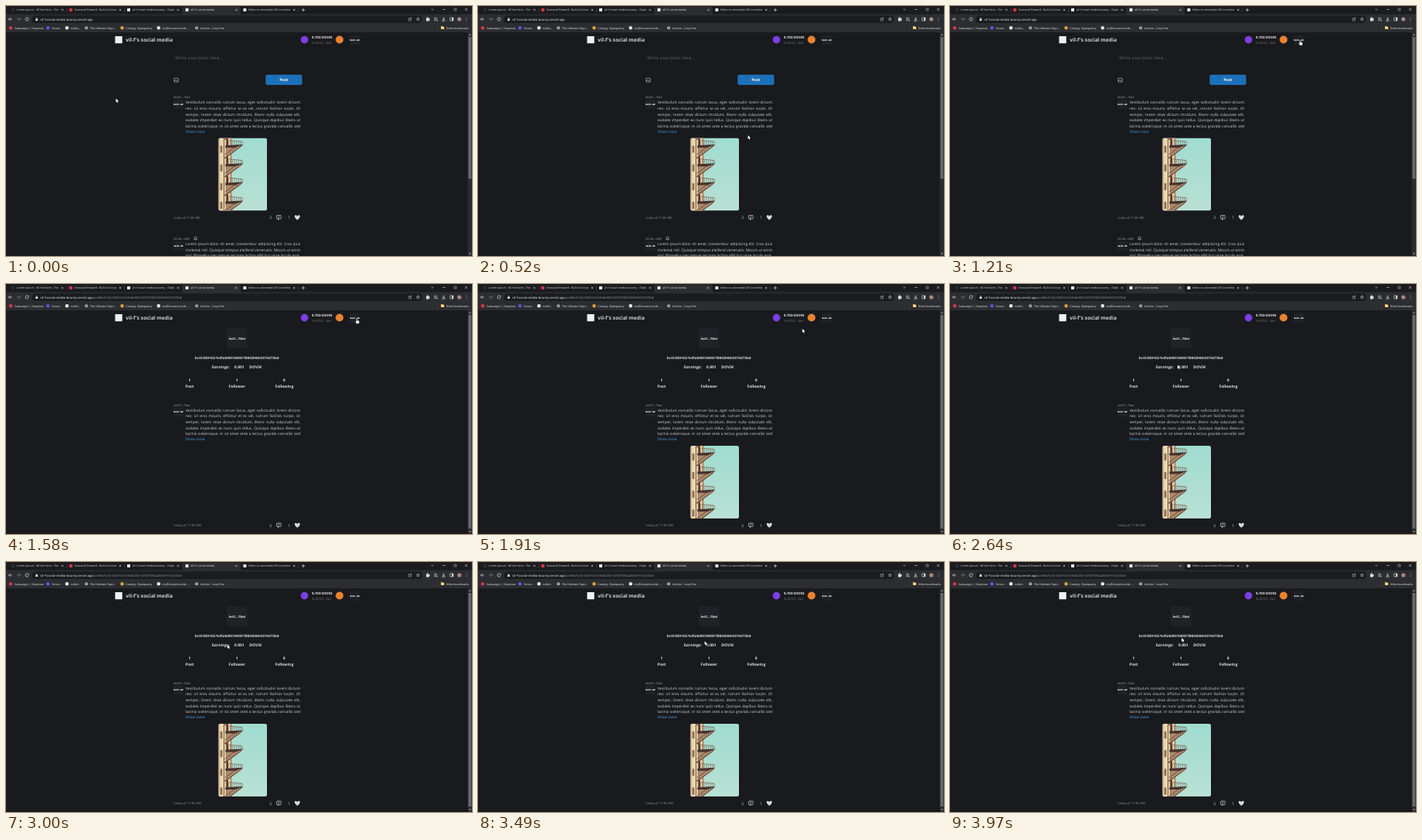
Write an HTML page with a canvas that moves like this. It is 600 by 323 pixels and loops after 4 s.

```html
<!DOCTYPE html>
<html lang="en">
<head>
<meta charset="utf-8">
<title>Social media demo</title>
<style>
html, body { margin: 0; width: 100%; height: 100%; overflow: hidden; background: #191a1d; }
canvas { display: block; width: 600px; height: 323px; }
</style>
</head>
<body>
<canvas id="stage"></canvas>
<script>
const W = 600, H = 323, LOOP = 4000;
const PAGE_AT = 1400, PHOTO_AT = 1850;
const FONT = '"Open Sans", "Noto Sans", sans-serif';
const PAGE = '#191a1d', BOX = '#212227', LIGHT = '#d0d1d4', DIM = '#8d9096';
const STRIP = '#1b1c1f', BAR = '#2c2d31', INK = '#dcdee1';
const ADDR = '0x3C5D81627e4fab0941605D7B842E68c9315d72bd';
const TOKEN = 'DOVIK';
const short = (head, tail) => ADDR.slice(0, head) + '...' + ADDR.slice(-tail);

const POST_1 = [
  'Vestibulum convallis rutrum lacus, eget sollicitudin lorem dictum',
  'nec. Ut eros mauris, efficitur et ex vel, rutrum facilisis turpis. Ut',
  'semper, lorem vitae dictum tincidunt, libero nulla vulputate elit,',
  'sodales imperdiet ex nunc quis tellus. Quisque dapibus libero ut',
  'lacinia scelerisque. In sit amet ante a lectus gravida convallis sed'
];
const POST_2 = [
  'Lorem ipsum dolor sit amet, consectetur adipiscing elit. Cras quis',
  'molestie nisl. Quisque tempus eleifend venenatis. Mauris ut enim',
  'nisl. Phasellus nec neque vel ante lacinia efficitur vitae iaculis erat.'
];

// time, x, y of the pointer tip
const PATH = [
  [0, 141.5, 119.5], [520, 347.5, 167], [1010, 450, 44.5], [1210, 450.3, 44.5],
  [1580, 451.2, 45], [1740, 451.2, 45], [2300, 300.3, 102.3], [3000, 285, 106.7],
  [3970, 298.3, 98], [4000, 298.3, 98]
];

const canvas = document.getElementById('stage');
const dpr = window.devicePixelRatio || 1;
canvas.width = W * dpr;
canvas.height = H * dpr;
const c = canvas.getContext('2d');

function rect(x, y, w, h, fill, r = 0) {
  c.fillStyle = fill;
  c.beginPath();
  c.roundRect(x, y, w, h, r);
  c.fill();
}

function disc(x, y, r, fill) {
  c.fillStyle = fill;
  c.beginPath();
  c.arc(x, y, r, 0, Math.PI * 2);
  c.fill();
}

function ring(x, y, r, color, width = 0.6, from = 0, to = Math.PI * 2) {
  c.strokeStyle = color;
  c.lineWidth = width;
  c.beginPath();
  c.arc(x, y, r, from, to);
  c.stroke();
}

function trace(points) {
  c.beginPath();
  for (let i = 0; i < points.length; i += 2) c.lineTo(points[i], points[i + 1]);
}

function line(color, width, ...points) {
  trace(points);
  c.strokeStyle = color;
  c.lineWidth = width;
  c.stroke();
}

function poly(fill, ...points) {
  trace(points);
  c.closePath();
  c.fillStyle = fill;
  c.fill();
}

function frame(x, y, w, h, color, r = 0.6, width = 0.6) {
  c.strokeStyle = color;
  c.lineWidth = width;
  c.beginPath();
  c.roundRect(x, y, w, h, r);
  c.stroke();
}

// Type is set at ten times its size and scaled down, for exact advances.
function text(str, x, y, size, color, style = '', align = 'left') {
  c.save();
  c.translate(x, y);
  c.scale(0.1, 0.1);
  c.font = `${style} ${size * 10}px ${FONT}`;
  c.textAlign = align;
  c.fillStyle = color;
  c.fillText(str, 0, 0);
  c.restore();
}

function justified(str, x, y, width, size, color) {
  const words = str.split(' ');
  c.font = `${size * 10}px ${FONT}`;
  const widths = words.map(w => c.measureText(w).width / 10);
  const gap = (width - widths.reduce((a, b) => a + b)) / (words.length - 1);
  words.forEach((word, i) => {
    text(word, x, y, size, color);
    x += widths[i] + gap;
  });
}

function clipped(x, y, w, h, draw) {
  c.save();
  c.beginPath();
  c.rect(x, y, w, h);
  c.clip();
  draw();
  c.restore();
}

function cross(x, y, r, color) {
  line(color, 0.6, x - r, y - r, x + r, y + r);
  line(color, 0.6, x - r, y + r, x + r, y - r);
}

function tab(x, title, color, active) {
  if (active) rect(x - 6, 0.8, 75, 12, BAR, 2.5);
  rect(x - 2, 3, 4, 4, color, 0.8);
  clipped(x + 4.5, 0, 54, 10, () => text(title, x + 4.5, 6.4, 3.65, active ? '#f0f1f3' : '#d8dadd', '500'));
  cross(x + 63.5, 5, 1.2, INK);
}

function tabs() {
  rect(0, 0, W, 34, STRIP);
  tab(9, 'Lorem ipsum - All the facts - Text', '#2c2d31');
  tab(83.5, 'Seasonal Reward - Build a Social', '#d9364c');
  tab(158, 'vil-f-social-media-bounty – Deploy', '#f2f2f2');
  rect(0, 10.5, W, 23.5, BAR);
  tab(233, "vil-f's social media", '#f2f2f2', true);
  tab(307.5, 'Video to animated GIF converter', '#e4e4e4');
  for (const x of [78.5, 152.5, 376]) line('#4c4e52', 0.5, x, 2.5, x, 8);
  line(INK, 0.7, 380.5, 5, 385, 5);
  line(INK, 0.7, 382.7, 2.8, 382.7, 7.2);
  line(INK, 0.6, 547.5, 3.8, 549, 5.2, 550.5, 3.8);
  line(INK, 0.6, 562.5, 4.5, 566, 4.5);
  frame(577, 3.2, 2.8, 2.8, INK, 0.3, 0.5);
  cross(592.5, 4.5, 1.6, INK);
}

function toolbar(profile) {
  line(INK, 0.7, 8, 17, 3.5, 17, 5.6, 14.9);
  line(INK, 0.7, 3.5, 17, 5.6, 19.1);
  line('#7b7e83', 0.7, 14, 17, 18.5, 17, 16.4, 14.9);
  line('#7b7e83', 0.7, 18.5, 17, 16.4, 19.1);
  ring(27, 17, 2, INK, 0.7, 0.2, 5.4);
  poly(INK, 27.6, 16.4, 29.3, 16.4, 29.3, 14.7);

  rect(33, 12.2, 503, 9.8, STRIP, 4.9);
  rect(38, 16.5, 3, 2.6, INK, 0.3);
  ring(39.5, 16.4, 1, INK, 0.5, Math.PI, Math.PI * 2);
  const host = 'vil-f-social-media-bounty.vercel.app';
  text(host, 44.2, 18.5, 4.1, '#f0f1f3');
  if (profile) {
    c.font = `41px ${FONT}`;
    text('/profile/' + ADDR, 44.2 + c.measureText(host).width / 10, 18.5, 4.1, '#8f949a');
  }

  frame(518.4, 15.8, 3.2, 3.2, INK, 0.4, 0.5);
  line(INK, 0.5, 520, 17, 522.4, 14.6);
  const star = [];
  for (let i = 0; i < 11; i++) {
    const a = i * Math.PI / 5 - Math.PI / 2, r = i % 2 ? 1 : 2.3;
    star.push(530.5 + r * Math.cos(a), 17 + r * Math.sin(a));
  }
  line(INK, 0.5, ...star);
  rect(541, 15.6, 3.8, 3.8, INK, 0.5);
  disc(542.8, 15.4, 0.9, INK);
  disc(545, 17.4, 0.9, INK);
  for (let i = 0; i < 3; i++) line(INK, 0.6, 551, 15.4 + i * 1.6, i < 2 ? 555 : 553.4, 15.4 + i * 1.6);
  disc(555, 18.6, 0.8, INK);
  line(INK, 0.7, 563.5, 14.6, 563.5, 18);
  line(INK, 0.7, 561.8, 16.6, 563.5, 18.2, 565.2, 16.6);
  line(INK, 0.7, 561.3, 19.2, 565.7, 19.2);
  frame(571.5, 15, 4.4, 4, INK, 0.4);
  rect(574, 15, 1.9, 4, INK);
  disc(583.7, 17, 2.6, '#a58a80');
  for (let i = 0; i < 3; i++) disc(593, 15.2 + i * 1.8, 0.45, INK);
}

function globe(x, y) {
  disc(x, y, 2, '#c9cbce');
  line(BAR, 0.4, x - 2, y, x + 2, y);
  line(BAR, 0.4, x, y - 2, x, y + 2);
}

function bookmarks() {
  const marks = [
    [6, 'Campaigns | HeapLow', '#d9364c'], [54, 'Tarvon', '#5a55e0'],
    [78.5, 'nolidu', '#f0f0f0'], [103.5, 'The Ultimate Topic...'],
    [149.5, 'Catalog - Bytequarry', '#d8a63a'], [196.5, 'mqlTorvan/vscode-...', '#f0f0f0'],
    [245.5, 'Archive - Loop Fest']
  ];
  for (const [x, label, color] of marks) {
    if (color) rect(x - 2, 26.2, 4, 4, color, 0.7);
    else globe(x, 28.2);
    text(label, x + 4.7, 29.5, 3.55, '#f0f1f3', '500');
  }
  line('#55575b', 0.5, 556, 25.5, 556, 31);
  rect(560, 26, 2.2, 2, '#f3d27a', 0.4);
  rect(560, 26.7, 4.2, 3.3, '#f3d27a', 0.4);
  text('Other bookmarks', 566.8, 29.5, 3.55, '#f0f1f3', '500');
}

function scrollbar(bottom) {
  rect(594.5, 34, 5.5, H - 34, '#2b2c2f');
  rect(595.3, 40, 3.9, bottom - 40, '#66686b');
  poly('#9a9c9f', 595.8, 38, 598.8, 38, 597.3, 36);
  poly('#9a9c9f', 595.8, 319, 598.8, 319, 597.3, 321);
}

function avatar(x, y, label = short(4, 2)) {
  rect(x, y, 12, 12, BOX, 0.8);
  text(label, x + 6, y + 7, 2.7, '#fff', '800', 'center');
}

function header() {
  rect(140.5, 39, 9.2, 9.2, '#f1f1f1');
  text("vil-f's social media", 154.2, 46, 6.6, LIGHT, 'bold');
  disc(384.3, 43.6, 4.8, '#7b3fe4');
  text('0.703 ' + TOKEN, 394, 42.4, 4.35, '#ebecee', 'bold');
  text(ADDR.slice(0, 6) + '...' + ADDR.slice(-3), 394, 48.8, 4, '#74777d');
  disc(429.4, 43.5, 5, '#e8822e');
  avatar(443, 38);
}

function flight(t) {
  const wood = '#7a5646', dark = '#46332d';
  poly('#b08c6c', 11, t + 3, 25, t + 4, 10, t + 15);
  poly(dark, 9, t + 1.5, 31, t + 0.5, 31, t + 2, 22, t + 4.5, 9, t + 4.5);
  line(wood, 2, 8, t + 18, 29, t + 2.5);
  line('#d9bb92', 0.6, 9, t + 16.2, 28, t + 2.2);
  line(dark, 0.6, 8, t + 13.5, 25, t + 1);
  line(wood, 0.6, 13, t - 5, 23, t - 4, 31, t - 3, 31, t + 1);
  for (let x = 13; x < 31; x += 2.6) line(wood, 0.5, x, t - 4.6, x, t + 1);
  for (let x = 10; x < 24; x += 2.6) line(wood, 0.4, x, t + 12 - (x - 10) * 0.73, x, t + 17 - (x - 10) * 0.73);
}

function photo(x, y) {
  const w = 62.5, h = 94;
  c.save();
  c.translate(x, y);
  c.beginPath();
  c.roundRect(0, 0, w, h, 2.5);
  c.clip();
  const sky = c.createLinearGradient(0, 0, 0, h);
  sky.addColorStop(0, '#9fdcd0');
  sky.addColorStop(1, '#b9e1d4');
  c.fillStyle = sky;
  c.fillRect(0, 0, w, h);
  rect(0, 0, 17, h, '#ead7b2');
  rect(0, 0, 1.5, h, '#c6a880');
  rect(6.5, 0, 1.3, h, '#8b6a50');
  rect(10, 0, 2.6, h, '#54392e');
  rect(15.3, 0, 1.7, h, '#a07d5f');
  for (let i = -1; i < 4; i++) {
    const t = 8 + i * 24.2;
    rect(2.4, t + 2, 2.6, 9, '#8d6b50');
    flight(t);
  }
  c.restore();
}

function post(y, withPhoto, style) {
  text(short(5, 4), 216, y + 2.2, 3.45, '#b4b6ba');
  avatar(216, y + 4);
  POST_1.forEach((row, i) => justified(row, 231, y + 9.2 + i * 7.72, 148, 4.85, LIGHT));
  text('Show more', 231, y + 46.7, 4.75, '#45a5ee');
  if (withPhoto) photo(273.5, y + 53.5);

  const f = y + 156.3;
  text('today at 11:00 AM', 216, f + 1.6, 4.15, DIM, style);
  text('2', 339.3, f + 1.8, 5, LIGHT);
  frame(348.4, f - 2.8, 5.8, 4.5, LIGHT, 0.8, 0.7);
  poly(LIGHT, 349.8, f + 1.7, 352, f + 1.7, 350, f + 3.5);
  line(LIGHT, 0.5, 349.8, f - 1.2, 352.8, f - 1.2);
  line(LIGHT, 0.5, 349.8, f + 0.1, 352, f + 0.1);
  text('1', 363.2, f + 1.8, 5, LIGHT);
  c.fillStyle = '#d8d9db';
  c.beginPath();
  c.moveTo(375.1, f + 3.1);
  c.bezierCurveTo(368.5, f - 1.8, 373, f - 5, 375.1, f - 1.7);
  c.bezierCurveTo(377.2, f - 5, 381.7, f - 1.8, 375.1, f + 3.1);
  c.fill();
}

function home() {
  text('Write your post here...', 218, 68.8, 5.9, '#62656c');
  frame(216.5, 93.2, 5.4, 5, LIGHT, 0.8);
  line(LIGHT, 0.6, 216.8, 97.2, 218.4, 95.7, 219.6, 96.8, 220.5, 96, 221.8, 97.1);
  rect(334.3, 88.8, 47, 13.2, '#1c70b9', 2);
  text('Post', 357.6, 97.2, 5, '#fff', 'bold', 'center');
  post(117, true, 'italic');

  text('0x7d2...c480', 216, 301.9, 3.45, '#b4b6ba');
  ring(244, 299.8, 1.5, LIGHT, 0.6, Math.PI, Math.PI * 2);
  line(LIGHT, 0.6, 242.5, 299.6, 242.1, 301.4, 245.9, 301.4, 245.5, 299.6);
  disc(244, 302.2, 0.5, LIGHT);
  avatar(216, 304, '0x7d...80');
  POST_2.forEach((row, i) => justified(row, 231, 309 + i * 7.72, 148, 4.85, LIGHT));
}

function profilePage(withPhoto) {
  const bold = (str, x, y, size = 5) => text(str, x, y, size, '#dedfe2', 'bold', 'center');
  rect(284, 57, 26.6, 26.2, BOX, 1);
  text(short(4, 4), 297.5, 71.5, 3.7, '#fff', 'bold', 'center');
  bold(ADDR, 297.3, 97, 4.42);
  bold('Earnings:', 276.5, 109.3);
  bold('0.001', 300.3, 109.3);
  bold(TOKEN, 321.3, 109.3);
  [['1', 'Post', 236.5], ['1', 'Follower', 297.4], ['0', 'Following', 358.3]].forEach(([n, label, x]) => {
    bold(n, x, 125.6);
    bold(label, x, 134.2);
  });
  post(155.4, withPhoto, '');
}

function pointerAt(t) {
  const i = PATH.findIndex(p => p[0] > t);
  const [t0, x0, y0] = PATH[i - 1], [t1, x1, y1] = PATH[i];
  const u = (t - t0) / (t1 - t0), e = u * u * (3 - 2 * u);
  return [x0 + (x1 - x0) * e, y0 + (y1 - y0) * e];
}

function pointer(t) {
  const [x, y] = pointerAt(t);
  c.save();
  c.translate(x, y);
  c.lineJoin = 'round';
  if (x > 443 && x < 455 && y > 38 && y < 50) {
    trace([0, 0, 1, 0, 1.2, 2.2, 3.6, 2.8, 3.6, 4.6, 2.9, 6.2, 0.4, 6.2, -1.4, 3.9, -0.9, 3.2, 0, 3.9]);
  } else {
    trace([0, 0, 0, 5, 1.2, 4, 2, 5.8, 2.9, 5.4, 2.1, 3.7, 3.6, 3.6]);
  }
  c.closePath();
  c.strokeStyle = '#000';
  c.lineWidth = 0.8;
  c.stroke();
  c.fillStyle = '#fff';
  c.fill();
  c.restore();
}

function draw(t) {
  const profile = t >= PAGE_AT;
  c.setTransform(dpr, 0, 0, dpr, 0, 0);
  c.textRendering = 'geometricPrecision';
  rect(0, 0, W, H, PAGE);
  if (profile) profilePage(t >= PHOTO_AT);
  else home();
  header();
  tabs();
  toolbar(profile);
  bookmarks();
  scrollbar(profile ? 316 : 223);
  pointer(t);
}

const start = performance.now();
function tick(now) {
  draw(Math.max(0, now - start) % LOOP);
  requestAnimationFrame(tick);
}
draw(0);
requestAnimationFrame(tick);
</script>
</body>
</html>
```
